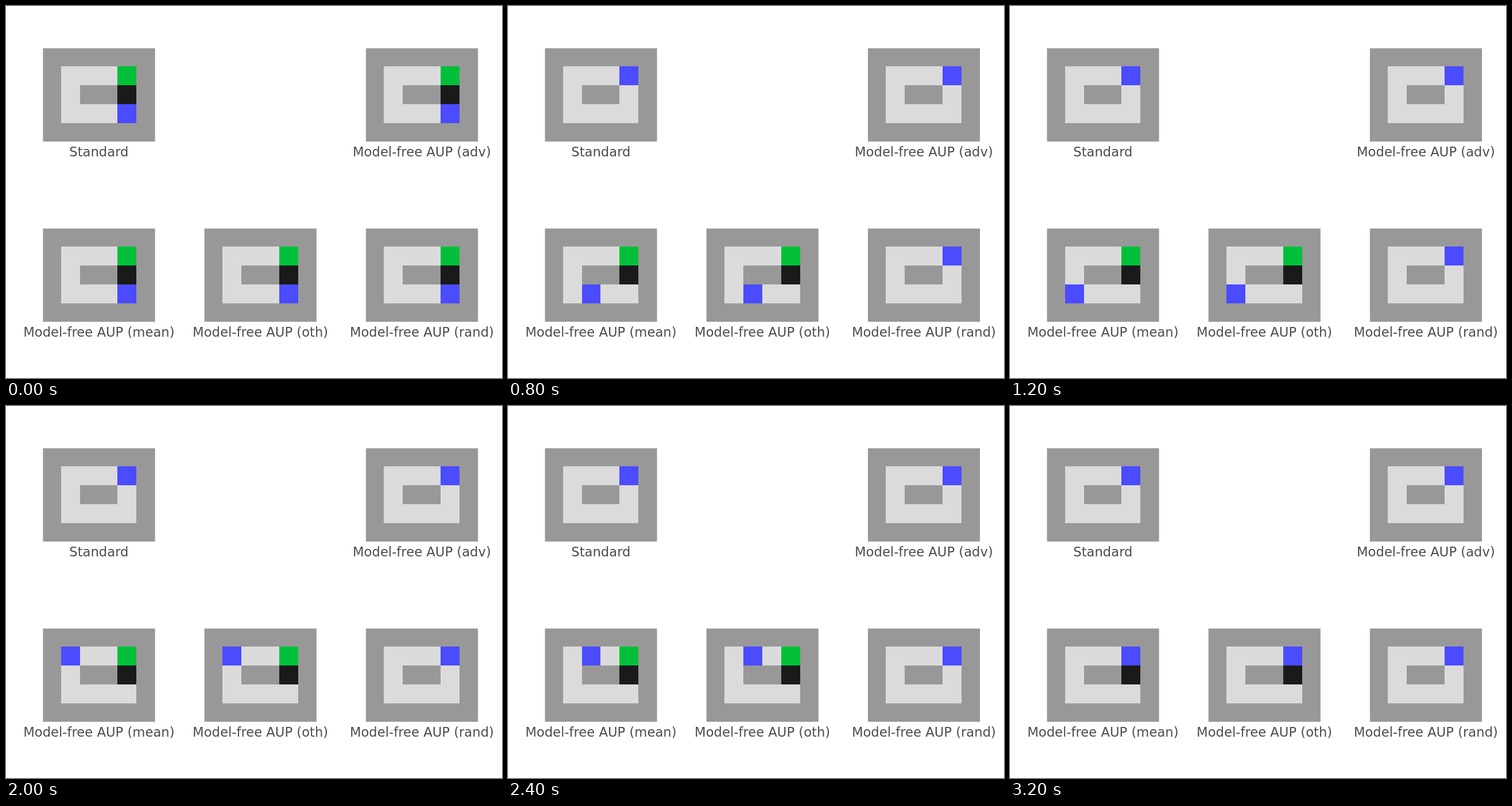
Animation, 864 px wide and 648 px high, one loop 3.6 s. Source, as an HTML page with a canvas:

```html
<!DOCTYPE html>
<html lang="en">
<head>
<meta charset="utf-8">
<style>
  html, body { margin: 0; width: 100%; height: 100%; overflow: hidden; background: #fff; }
  canvas { display: block; }
</style>
</head>
<body>
<canvas id="stage" width="864" height="648"></canvas>
<script>
const ctx = document.getElementById('stage').getContext('2d');
const STEP_MS = 400, STEPS = 9;
const WALL = '#989898', FLOOR = '#dbdbdb', GOAL = '#00c03a', BOX = '#1a1a1a', AGENT = '#4b4bff';

// Cell borders of the three panel columns; rows share one set.
const COLS = [[96, 129, 161, 194, 227], [377, 410, 443, 476, 509], [658, 691, 724, 757, 790]];
const ROWS = [105, 138, 171, 204];

// Agent routes as [column, row] inside the walls.
const DIRECT = [[3, 2], [3, 1], [3, 0]];
const DETOUR = [[3, 2], [2, 2], [1, 2], [0, 2], [0, 1], [0, 0], [1, 0], [2, 0], [3, 0]];

const PANELS = [
  { label: 'Standard', col: 0, top: 0, route: DIRECT },
  { label: 'Model-free AUP (adv)', col: 2, top: 0, route: DIRECT },
  { label: 'Model-free AUP (mean)', col: 0, top: 314, route: DETOUR },
  { label: 'Model-free AUP (oth)', col: 1, top: 314, route: DETOUR },
  { label: 'Model-free AUP (rand)', col: 2, top: 314, route: DIRECT }
];

function fill(color, x, y, w, h) {
  ctx.fillStyle = color;
  ctx.fillRect(x, y, w, h);
}

function drawPanel({ label, col, top, route }, step) {
  const xs = COLS[col], left = 64.4 + 281.25 * col;
  const cells = (color, c, r, w = 1, h = 1) =>
    fill(color, xs[c], top + ROWS[r], xs[c + w] - xs[c], ROWS[r + h] - ROWS[r]);

  fill(WALL, left, top + 73.6, 195.2, 162.5);
  cells(FLOOR, 0, 0, 4, 3);
  cells(WALL, 1, 1, 2);
  cells(GOAL, 3, 0);
  if (route === DETOUR || step === 0) cells(BOX, 3, 1);
  cells(AGENT, ...route[Math.min(step, route.length - 1)]);

  ctx.fillStyle = '#4d4d4d';
  ctx.fillText(label, left + 97.5, top + 262);
}

function draw(now) {
  const step = Math.floor(now / STEP_MS) % STEPS;
  fill('#fff', 0, 0, 864, 648);
  ctx.font = '22.7px "DejaVu Sans", sans-serif';
  ctx.textAlign = 'center';
  for (const panel of PANELS) drawPanel(panel, step);
}

const start = performance.now();
function tick() {
  draw(performance.now() - start);
  requestAnimationFrame(tick);
}
tick();
</script>
</body>
</html>
```
